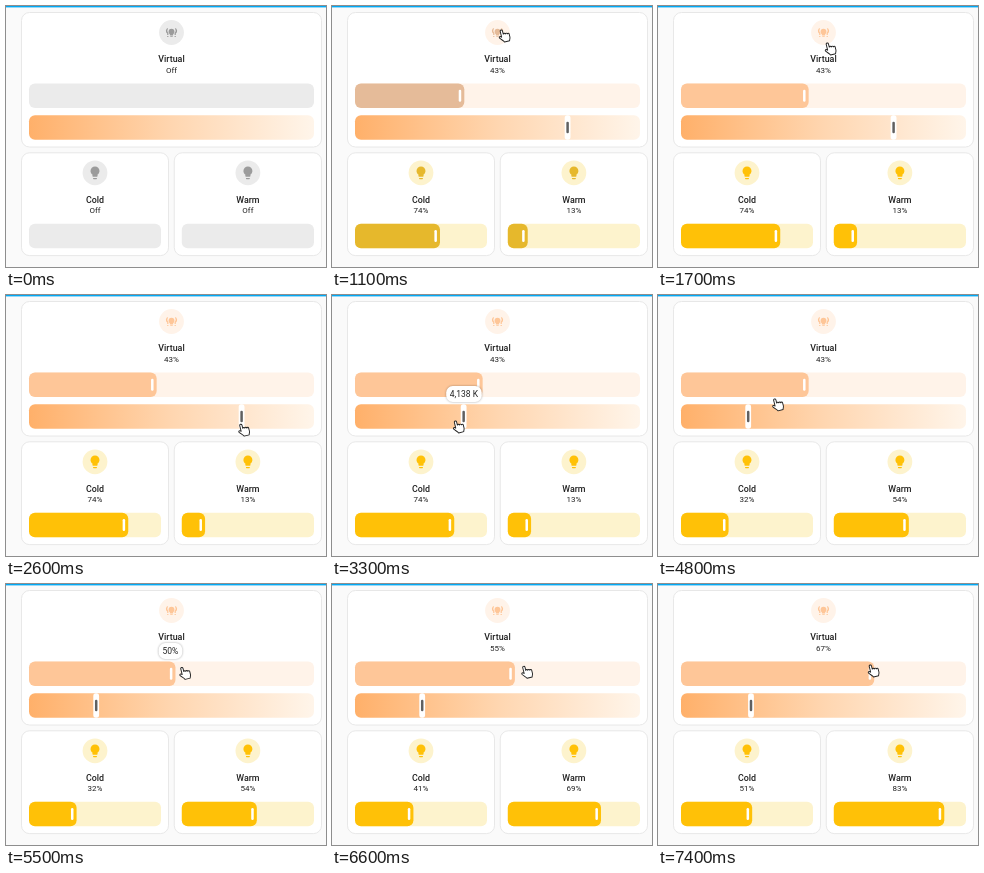
Write an HTML page that moves like this. It is 320x261 px and loops after 8 s.

```html
<!DOCTYPE html>
<html lang="en">
<head>
<meta charset="utf-8">
<title>Light controls</title>
<style>
  html, body { margin: 0; width: 100%; height: 100%; overflow: hidden; background: #fafafa; }
  svg { display: block; width: 320px; height: 261px; font-family: Roboto, sans-serif; }
  text { text-anchor: middle; fill: #212121; }
  .title { font-size: 8.9px; font-weight: 500; }
  .state { font-size: 8px; }
  .tip text { font-size: 8.5px; }
  .tip rect { filter: drop-shadow(0 .6px 1.2px #0005); }
</style>
</head>
<body>
<svg id="stage" viewBox="0 0 320 261"></svg>
<script>
const LOOP = 8000, TICK = 100, ON_AT = 900, SETTLE = 400;
const stage = document.getElementById('stage');

// Eased-out progress from 0 to 1 between two times.
const progress = (t, start, end, power = 2) =>
  1 - (1 - Math.min(1, Math.max(0, (t - start) / (end - start)))) ** power;

// Adds up moves of the form { at, end, to, power } from a first value.
const follow = (value, moves, t) => moves.reduce(
  (v, m) => v + (m.to - v) * progress(t, m.at, m.end, m.power), value);

const cursorMoves = [
  { at: 200, end: 700, x: 166, y: 23 },
  { at: 1100, end: 1200, x: 166, y: 36 },
  { at: 1700, end: 2200, x: 229, y: 129 },
  { at: 2300, end: 2800, x: 232, y: 128 },
  { at: 3000, end: 3800, x: 84, y: 124, power: 3 },
  { at: 4700, end: 5000, x: 137, y: 86 },
  { at: 5100, end: 5700, x: 177, y: 82 },
  { at: 6500, end: 7000, x: 209, y: 80 },
];
const cursor = (axis, from, t) => follow(from, cursorMoves.map(m => ({ ...m, to: m[axis] })), t);

const COOL_X = 235.6, WARM_X = 90.2;
const handleX = t => follow(COOL_X, [
  { at: 3000, end: 3800, to: WARM_X, power: 2.67 }, { at: 7000, end: 7300, to: 93 }], t);
const brightness = t => follow(43.4, [
  { at: 5150, end: 5750, to: 55, power: 1 }, { at: 6900, end: 7300, to: 67 }], t);

// The two lamps share the brightness in a ratio set by the colour temperature.
const warmth = t => .252 - .00655 * (handleX(t) - WARM_X);
const share = {
  virtual: brightness,
  cold: t => brightness(t) * (1 - warmth(t)),
  warm: t => brightness(t) * (1 + warmth(t)),
};

// Lamps and labels take new values only when a drag is released.
const releases = [4100, 5800, 7000];
const label = (id, t) => {
  const last = releases.filter(r => t > r).at(-1);
  return Math.round(share[id](last ? last + SETTLE : 0)) + '%';
};
const level = (id, t) => id === 'virtual' ? brightness(t) : follow(share[id](0),
  releases.map(r => ({ at: r, end: r + SETTLE, to: share[id](r + SETTLE) })), t);

const ORANGE = { main: [254, 198, 152], pale: [255, 243, 233] };
const YELLOW = { main: [255, 193, 7], pale: [253, 243, 205] };
const GREY = { main: [155, 155, 155], pale: [235, 235, 235] };
const mix = (a, b, k) => `rgb(${a.map((v, i) => Math.round(v + (b[i] - v) * k))})`;

const rect = (x, y, w, h, r, fill, extra = '') =>
  `<rect x="${x}" y="${y}" width="${w}" height="${h}" rx="${r}" fill="${fill}" ${extra}/>`;
const text = (x, y, cls, s) => `<text x="${x}" y="${y}" class="${cls}">${s}</text>`;

const BULB = 'M12 2a7 7 0 0 0-7 7c0 2.4 1.2 4.5 3 5.7V17a1 1 0 0 0 1 1h6a1 1 0 0 0 1-1v-2.3' +
  'c1.8-1.2 3-3.3 3-5.7a7 7 0 0 0-7-7M9 21a1 1 0 0 0 1 1h4a1 1 0 0 0 1-1v-1H9z';
const SIDE = 'M-3.4-4.4a3 3 0 0 0-.9 5.4v1.6h1.2V.8a4.6 4.6 0 0 1-.3-5.2zM-4.3 3.4h1.2v1h-1.2z';
const HAND = 'M3 7.4V1.8a1.1 1.1 0 0 1 2.2 0V5a1 1 0 0 1 1.9.3a1 1 0 0 1 1.9.4a.9.9 0 0 1 1.7.4V9' +
  'c0 1.8-1 2.3-1.1 3.5H4.6C4.1 11 2.1 9.8.9 7.9C.3 6.6 1.5 6 2.3 6.8z';

const bulb = (scale, y) => `<path d="${BULB}" transform="translate(0 ${y}) scale(${scale}) translate(-12 -12)"/>`;
const groupIcon = bulb(.42, .4) + `<path d="${SIDE}"/><path d="${SIDE}" transform="scale(-1 1)"/>`;

const BAR_H = 24.4, PAD = 7.5;
const lights = [
  { id: 'virtual', name: 'Virtual', x: 15.5, y: 6.5, w: 300, h: 134.5, icon: groupIcon, color: ORANGE },
  { id: 'cold', name: 'Cold', x: 15.5, y: 146.8, w: 147, h: 102.8, icon: bulb(.64, 0), color: YELLOW },
  { id: 'warm', name: 'Warm', x: 168.3, y: 146.8, w: 147.2, h: 102.8, icon: bulb(.64, 0), color: YELLOW },
];

function fillWidth({ id, w }, t) {
  const grow = progress(t, 800, 1200, 1.4), thumb = 7;
  return (thumb + (w - 2 * PAD - thumb) * level(id, t) / 100) * grow;
}

function drawLight(light, t) {
  const { id, name, x, y, w, h, icon, color } = light;
  const cx = x + w / 2, cy = y + 20, barX = x + PAD, barY = y + 71;
  const main = mix(GREY.main, color.main, progress(t, 800, 1200, 1));
  const pale = mix(GREY.pale, color.pale, progress(t, 800, 1100));
  const fill = fillWidth(light, t);
  let out = rect(x, y, w, h, 8, '#fff', 'stroke="#e2e2e2" stroke-width=".8"') +
    `<circle cx="${cx}" cy="${cy}" r="12.4" fill="${pale}"/>` +
    `<g transform="translate(${cx} ${cy})" fill="${main}">${icon}</g>` +
    text(cx, cy + 29.7, 'title', name) +
    text(cx, cy + 40, 'state', t < ON_AT ? 'Off' : label(id, t)) +
    rect(barX, barY, w - 2 * PAD, BAR_H, 6, pale);
  if (fill > 0) out += rect(barX, barY, fill, BAR_H, 6, main);
  if (fill > 8) out += rect(barX + fill - 5.6, barY + 6.2, 2.5, 12, 1.2, '#fff');
  return out;
}

function drawTemperature(t) {
  const x = handleX(t), y = 109.3;
  let out = rect(23, y, 285, BAR_H, 6, 'url(#temperature)');
  if (t >= ON_AT) {
    out += rect(x - 2.9, y, 5.8, BAR_H, 2.6, '#fff') + rect(x - 1.25, y + 6.4, 2.5, 11.6, 1.2, '#606060');
  }
  return out;
}

// A value bubble that shows at once and fades briefly after its end.
function drawTip(x, y, w, content, start, end, t) {
  if (t < start || t >= end + TICK) return '';
  return `<g class="tip" opacity="${t < end ? 1 : .4}">` +
    rect(x - w / 2, y, w, 16, 6.5, '#fff') + text(x, y + 11, '', content) + '</g>';
}

function drawTips(t) {
  const x = handleX(t);
  const kelvin = Math.round(3682 + 11 * (x - WARM_X)).toLocaleString('en-US');
  return drawTip(x + .3, 91, 35.5, kelvin + ' K', 3100, 4100, t) +
    drawTip(18 + fillWidth(lights[0], t), 59, 23.6, Math.round(brightness(t)) + '%', 5200, 5900, t);
}

function drawCursor(t) {
  if (t < 300) return '';
  return `<path d="${HAND}" fill="#fff" stroke="#222" stroke-width=".9" stroke-linejoin="round"
    transform="translate(${cursor('x', 220, t)} ${cursor('y', 130, t)}) rotate(-14 5 6) scale(1.05)"/>`;
}

const defs = `<defs><linearGradient id="temperature">
  <stop stop-color="#ffb06a"/><stop offset=".5" stop-color="#ffd6b0"/><stop offset="1" stop-color="#fff5ea"/>
</linearGradient></defs>`;

function render(t) {
  stage.innerHTML = defs + rect(0, 0, 320, 261, 0, '#fafafa') + rect(0, 0, 320, 1.4, 0, '#03a9f4') +
    lights.map(light => drawLight(light, t)).join('') +
    drawTemperature(t) + drawTips(t) + drawCursor(t);
}

// The picture advances ten times a second.
const start = performance.now();
let shown = -1;
function frame() {
  const t = Math.floor((performance.now() - start) % LOOP / TICK) * TICK;
  if (t !== shown) render(shown = t);
  requestAnimationFrame(frame);
}
frame();
</script>
</body>
</html>
```
